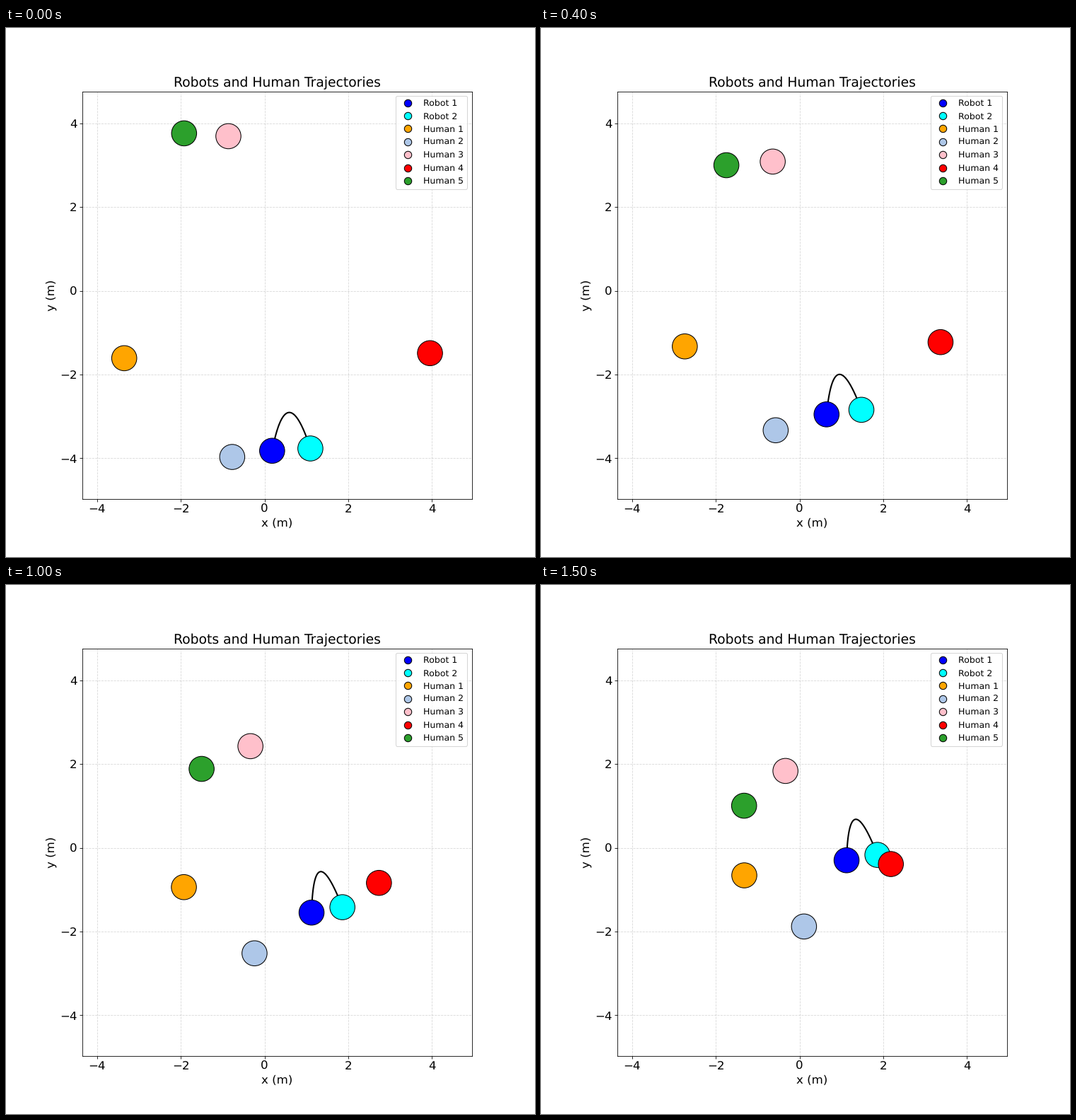
Recreate the animation shown at these times as a matplotlib script. Size 748 by 748 pixels, loop 1.6 s.

```python
import numpy as np
import matplotlib.pyplot as plt
from matplotlib.animation import FuncAnimation
from matplotlib.lines import Line2D
from matplotlib.patches import Circle

STEPS = 16
TURN = 12  # step at which the humans start to dodge
STEP_LENGTH = 0.25
RADIUS = 0.3
ROPE_LENGTH = 2.0

plt.rcParams["font.family"] = "DejaVu Sans"
plt.rcParams["text.hinting"] = "no_hinting"


def walk(start, headings):
    """Constant-speed path that follows one heading (degrees) per step."""
    angles = np.radians(headings)
    moves = STEP_LENGTH * np.column_stack([np.cos(angles), np.sin(angles)])
    return np.vstack([start, start + np.cumsum(moves, axis=0)])


def stroll(start, mid, turn, end):
    """Steadily changing speed up to the turn, then straight to the end."""
    start, mid, turn, end = map(np.array, (start, mid, turn, end))
    step = np.arange(STEPS)[:, None]
    t = step / TURN
    curve = start + t * (turn - start) + 4 * t * (1 - t) * (mid - (start + turn) / 2)
    line = turn + (step - TURN) / (STEPS - 1 - TURN) * (end - turn)
    return np.where(step <= TURN, curve, line)


def rope(a, b):
    """Parabola over the chord a-b, its apex set by the rope length."""
    half = (b - a) / 2
    reach = np.hypot(*half)
    height = np.sqrt((ROPE_LENGTH / 2) ** 2 - reach ** 2)
    normal = np.array([-half[1], half[0]]) / reach
    s = np.linspace(-1, 1, 80)[:, None]
    return (a + b) / 2 + s * half + height * (1 - s ** 2) * normal


AGENTS = [
    ("Robot 1", "blue",
     walk((0.180, -3.820), [67.5] * 2 + [45] + [67.5] * 6 + [90] * 6)),
    ("Robot 2", "cyan",
     walk((1.094, -3.765), [67.5] * 8 + [90] * 7)),
    ("Human 1", "orange", stroll(
        (-3.354, -1.608), (-2.458, -1.192), (-1.684, -0.817), (-1.321, -0.656))),
    ("Human 2", "#aec7e8", stroll(
        (-0.774, -3.968), (-0.465, -3.040), (-0.123, -2.287), (0.105, -1.878))),
    ("Human 3", "pink", stroll(
        (-0.865, 3.697), (-0.537, 2.837), (-0.245, 2.278), (-0.338, 1.839))),
    ("Human 4", "red", stroll(
        (3.952, -1.488), (3.124, -1.094), (2.585, -0.709), (2.181, -0.386))),
    ("Human 5", "tab:green", stroll(
        (-1.924, 3.765), (-1.666, 2.628), (-1.428, 1.523), (-1.326, 1.008))),
]

fig, ax = plt.subplots(figsize=(10, 10), dpi=74.8)

# The view leaves a margin of one metre around all paths.
points = np.vstack([path for _, _, path in AGENTS])
low, high = points.min(axis=0) - 1, points.max(axis=0) + 1
ax.set_xlim(low[0], high[0])
ax.set_ylim(low[1], high[1])
ax.set_aspect("equal")
ax.set_xticks(range(-4, 5, 2))
ax.set_yticks(range(-4, 5, 2))
ax.tick_params(labelsize=16)
ax.set_xlabel("x (m)", fontsize=16)
ax.set_ylabel("y (m)", fontsize=16)
ax.set_title("Robots and Human Trajectories", fontsize=18)
ax.grid(True, linestyle="--", alpha=0.5)

cable, = ax.plot([], [], color="black", linewidth=2, zorder=2)
circles = [ax.add_patch(Circle(path[0], RADIUS, facecolor=color,
                               edgecolor="black", zorder=3))
           for _, color, path in AGENTS]
handles = [Line2D([], [], linestyle="none", marker="o", markersize=10,
                  markerfacecolor=color, markeredgecolor="black", label=name)
           for name, color, _ in AGENTS]
ax.legend(handles=handles, loc="upper right", fontsize=12, labelspacing=0.54)


def update(step):
    for circle, (_, _, path) in zip(circles, AGENTS):
        circle.center = path[step]
    cable.set_data(*rope(AGENTS[0][2][step], AGENTS[1][2][step]).T)
    return [cable, *circles]


anim = FuncAnimation(fig, update, frames=STEPS, interval=100,
                     repeat=True, repeat_delay=0)
plt.show()
```
